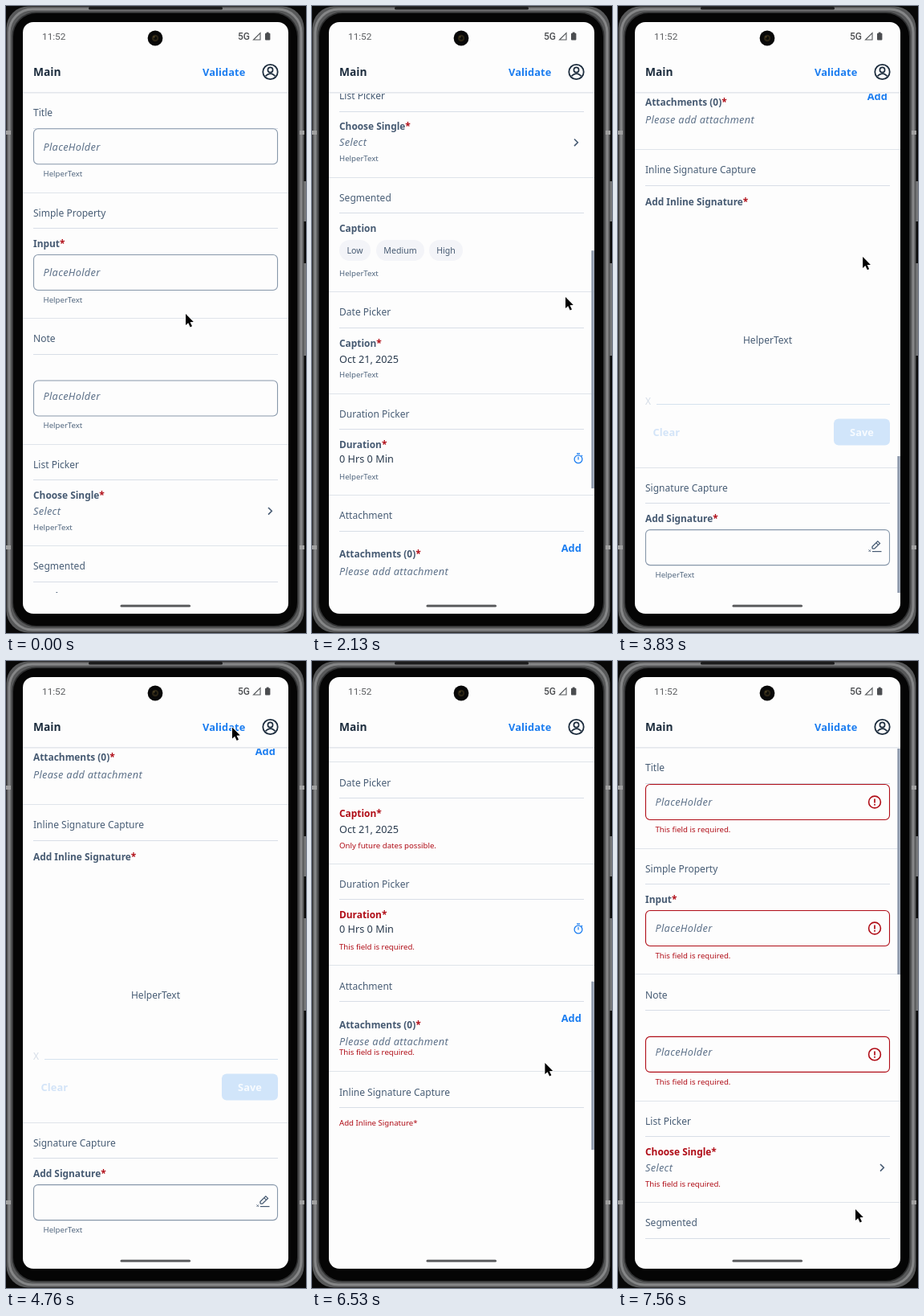
Write an HTML page with a canvas that moves like this. It is 374x780 px and loops after 7660 ms.

```html
<!DOCTYPE html>
<html lang="en">
<head>
<meta charset="utf-8">
<title>Form validation</title>
<style>
html, body { margin: 0; width: 100%; height: 100%; overflow: hidden; background: #000; }
canvas { display: block; width: 374px; height: 780px; }
</style>
</head>
<body>
<canvas id="stage"></canvas>
<script>
const W = 374, H = 780, LOOP = 7660, VALIDATED = 5050;
const canvas = document.getElementById('stage');
const ctx = canvas.getContext('2d');
const dpr = window.devicePixelRatio || 1;
canvas.width = W * dpr;
canvas.height = H * dpr;

const C = {
  page: '#fdfdfd', title: '#485d75', label: '#465a72', helper: '#52677f', value: '#2a3b4e',
  hint: '#5d7189', dark: '#1d2d3e', blue: '#1b7df0', red: '#b00d17', rule: '#d8dee7',
  box: '#8797aa', pale: '#d1e5fa', chip: '#f3f4f8', bar: '#8f9bad'
};
const SANS = '"Noto Sans", "Open Sans", sans-serif';
const FONTS = {
  title: { css: `400 12px ${SANS}`, size: 12, gap: 0.02 },
  label: { css: `600 11.9px ${SANS}`, size: 11.9, gap: 0 },
  value: { css: `400 12.7px ${SANS}`, size: 12.7, gap: 0 },
  hint: { css: `italic 400 12.7px ${SANS}`, size: 12.7, gap: 0.32 },
  small: { css: `400 9.65px ${SANS}`, size: 9.65, gap: 0 },
  chip: { css: `500 10.6px ${SANS}`, size: 10.6, gap: 0 },
  action: { css: `700 12.8px ${SANS}`, size: 12.8, gap: 0.1 },
  head: { css: `900 13.8px ${SANS}`, size: 13.8, gap: 0 },
  clock: { css: '400 11.8px Roboto, sans-serif', size: 11.8, gap: 0 },
  signal: { css: '500 12px Roboto, sans-serif', size: 12, gap: 0 }
};

// Motion tracks: time followed by values
const scrollTrack = [[1100, 0], [1950, 458.5], [2480, 458.5], [3130, 925.6], [3480, 1020.4],
  [5049, 1020.4], [5050, 1006.4], [6130, 1006.4], [6620, 644.3], [7060, 644.3], [7450, 0]];
const cursorTrack = [[150, 224, 383], [950, 300, 655], [1150, 302, 655], [1850, 316, 362],
  [2130, 316, 362], [2450, 314, 610], [2550, 313, 610], [3050, 307.8, 338.5], [3600, 307.8, 338.5],
  [4600, 282, 82.5], [5250, 282, 82.5], [5900, 284, 206], [6130, 284, 211.5],
  [6480, 290, 500], [6600, 291, 500], [7000, 296, 240], [7100, 296, 242.5], [7420, 296, 682]];
// Scroll offset, thumb top, thumb bottom
const thumbPlain = [[0, 108, 390], [458, 304, 600], [925, 510, 701], [1020, 560, 730]];
const thumbError = [[0, 108, 390], [644, 384, 597], [1006, 560, 730]];

const smooth = k => k * k * (3 - 2 * k);
const linear = k => k;

function sample(track, at, ease) {
  if (at <= track[0][0]) return track[0].slice(1);
  for (let i = 1; i < track.length; i++) {
    const a = track[i - 1], b = track[i];
    if (at <= b[0]) {
      const k = ease((at - a[0]) / (b[0] - a[0]));
      return a.slice(1).map((v, j) => v + (b[j + 1] - v) * k);
    }
  }
  return track[track.length - 1].slice(1);
}

function text(str, x, mid, font, color, align = 'left') {
  const f = FONTS[font];
  ctx.font = f.css;
  ctx.letterSpacing = f.gap + 'px';
  ctx.textAlign = align;
  ctx.fillStyle = color;
  ctx.fillText(str, x, mid + f.size * 0.36);
  return x + ctx.measureText(str).width;
}

function round(x, y, w, h, r) {
  ctx.beginPath();
  ctx.roundRect(x, y, w, h, r);
}

function fillRound(x, y, w, h, r, color) {
  round(x, y, w, h, r);
  ctx.fillStyle = color;
  ctx.fill();
}

function strokeRound(x, y, w, h, r, color, width = 1) {
  round(x, y, w, h, r);
  ctx.strokeStyle = color;
  ctx.lineWidth = width;
  ctx.stroke();
}

function path(points, color, width) {
  ctx.beginPath();
  points.forEach(([x, y], i) => i ? ctx.lineTo(x, y) : ctx.moveTo(x, y));
  ctx.strokeStyle = color;
  ctx.lineWidth = width;
  ctx.stroke();
}

function circle(x, y, r, color, width) {
  ctx.beginPath();
  ctx.arc(x, y, r, 0, Math.PI * 2);
  if (width) {
    ctx.strokeStyle = color;
    ctx.lineWidth = width;
    ctx.stroke();
  } else {
    ctx.fillStyle = color;
    ctx.fill();
  }
}

function rule(y, x1 = 34, x2 = 339, color = C.rule) {
  ctx.fillStyle = color;
  ctx.fillRect(x1, Math.round(y - 0.5), x2 - x1, 1);
}

function label(str, y, color = C.label) {
  text('*', text(str, 34, y, 'label', color), y, 'label', C.red);
}

function helper(y, error, x = 34, message = 'This field is required.') {
  text(error ? message : 'HelperText', x, y, 'small', error ? C.red : C.helper);
}

function alertIcon(x, y) {
  circle(x, y, 7.4, C.red, 1.6);
  path([[x, y - 4], [x, y + 1]], C.red, 1.7);
  circle(x, y + 3.3, 1, C.red);
}

function field(y, error, hint, hintY) {
  strokeRound(34.5, y + 0.5, 304, 44, 5.5, error ? C.red : C.box, 1.1);
  if (hint) text(hint, 46.5, hintY, 'hint', C.hint);
  if (error) alertIcon(320, y + 22.5);
  helper(y + 56.3, error, 46.5);
}

function section(name, y, first) {
  if (!first) rule(y - 25.5, 21, 352, '#dfe4ea');
  text(name, 34, y, 'title', C.title);
  rule(y + 19);
}

function stopwatch(x, y) {
  circle(x, y + 1, 4.9, C.blue, 1.3);
  path([[x - 2, y - 6], [x + 2, y - 6]], C.blue, 1.3);
  path([[x, y - 2], [x, y + 1.6]], C.blue, 1.2);
  path([[x + 3.8, y - 4], [x + 5, y - 2.8]], C.blue, 1.2);
}

function pencil(x, y) {
  path([[x - 4, y + 2.5], [x - 4, y], [x + 2.8, y - 6.8], [x + 5.5, y - 4.2], [x - 1.3, y + 2.6], [x - 4, y + 2.5]], C.label, 1.3);
  path([[x + 0.8, y - 4.8], [x + 3.4, y - 2.2]], C.label, 1.1);
  path([[x - 4, y + 6], [x + 7.5, y + 6]], C.label, 1.2);
  path([[x - 8.5, y + 3.8], [x - 6, y + 6.3]], C.label, 0.9);
  path([[x - 6, y + 3.8], [x - 8.5, y + 6.3]], C.label, 0.9);
}

function form(scroll, error) {
  const tone = error ? C.red : C.label;
  const shift = n => error ? n : 0;
  let y = 133 - scroll;
  section('Title', y, true);
  field(y + 19.3 + shift(0.7), error, 'PlaceHolder', y + 42);

  y = 257.5 - scroll + shift(1);
  section('Simple Property', y);
  label('Input', y + 38.5);
  field(y + 51.5, error, 'PlaceHolder', y + 74);

  y = 414 - scroll + shift(1.4);
  section('Note', y);
  field(y + 51.5, error, 'PlaceHolder', y + 71.3);

  y = 570.5 - scroll + shift(2);
  section('List Picker', y);
  label('Choose Single', y + 38, tone);
  text('Select', 34, y + 57.7, 'hint', C.hint);
  path([[327, y + 53.5], [331.3, y + 57.8], [327, y + 62.1]], C.label, 1.6);
  helper(y + 78, error);

  y = 697 - scroll + shift(2);
  section('Segmented', y);
  text('Caption', 34, y + 38, 'label', C.label);
  [['Low', 34, 39], ['Medium', 80, 60], ['High', 146, 42]].forEach(([name, x, w]) => {
    fillRound(x, y + 52.5, w, 26, 13, C.chip);
    text(name, x + w / 2, y + 65.5, 'chip', C.label, 'center');
  });
  if (!error) helper(y + 94, false);

  // Without its helper line the segmented block is shorter
  const lower = shift(-14) - scroll;
  y = 839.5 + lower;
  section('Date Picker', y);
  label('Caption', y + 38.3, tone);
  text('Oct 21, 2025', 34, y + 58, 'value', C.value);
  helper(y + 78, error, 34, 'Only future dates possible.');

  y = 966 + lower;
  section('Duration Picker', y);
  label('Duration', y + 38, tone);
  text('0 Hrs 0 Min', 34, y + 56, 'value', C.value);
  stopwatch(332, y + 55.3);
  helper(y + 78, error);

  y = 1092.5 + lower;
  section('Attachment', y);
  label('Attachments (0)', y + 48);
  text('Add', 336, y + 40.2, 'action', C.blue, 'right');
  text('Please add attachment', 34, y + 69, 'hint', C.hint);
  if (error) helper(y + 82.3, true);

  y = 1224.5 + lower;
  section('Inline Signature Capture', y);
  if (error) text('Add Inline Signature*', 34, y + 38, 'small', C.red);
  else {
    label('Add Inline Signature', y + 40);
    text('HelperText', 186.5, y + 212, 'title', C.title, 'center');
  }
  text('X', 34, y + 288 - shift(4), 'title', '#d5dde7');
  rule(y + 291 - shift(4), 48, 339, '#d5e2ef');
  const by = y + 326 - shift(2);
  text('Clear', 43.5, by, 'action', '#d3e4f8');
  fillRound(269, by - 16.5, 70, 33, 6, C.pale);
  text('Save', 304, by, 'action', '#f7fbff', 'center');
  if (error) helper(y + 346, true);

  y = 1620 + lower;
  section('Signature Capture', y);
  label('Add Signature', y + 38.5, tone);
  field(y + 51.5, error);
  if (!error) pencil(321, y + 73);
}

function phone() {
  ctx.fillStyle = '#080808';
  ctx.fillRect(0, 0, W, H);
  fillRound(369, 218, 6, 50, 1, '#77787a');
  fillRound(369, 320, 6, 115, 1, '#77787a');
  // Metal rim around the black bezel
  fillRound(0.5, 0.5, 371, 779, 27, '#58595a');
  strokeRound(4, 4, 364, 772, 29, '#858687', 3);
  ctx.fillStyle = '#a0a0a0';
  [155, 671].forEach(y => {
    ctx.fillRect(0, y, 6, 5);
    ctx.fillRect(366, y, 6, 5);
  });
  fillRound(7.5, 7.5, 357, 765, 30, '#303132');
  fillRound(9, 9, 354, 762, 29, '#050505');
  fillRound(103, 1, 167, 3.5, 1.5, '#1c1c1d');
  fillRound(21, 20, 331, 736, 13, C.page);
}

function chrome() {
  text('11:52', 45, 38, 'clock', '#5c5e61');
  text('5G', 289, 38, 'signal', '#4e5053');
  ctx.beginPath();
  ctx.moveTo(308.5, 42);
  ctx.lineTo(317, 42);
  ctx.lineTo(317, 33.5);
  ctx.closePath();
  ctx.strokeStyle = '#55585b';
  ctx.lineWidth = 1.1;
  ctx.stroke();
  fillRound(323, 33.8, 6.4, 8.8, 1, '#4b4d50');
  ctx.fillRect(324.8, 32.6, 2.8, 1.5);

  circle(186, 40, 9.4, '#080808');
  circle(186, 40, 4.2, '#2b2415');
  circle(186.3, 40, 2, '#0d0d0a');
  circle(184.5, 38.4, 0.9, '#64552e');

  text('Main', 34, 82, 'head', C.dark);
  text('Validate', 245, 82, 'action', C.blue);
  circle(329.5, 82, 9.2, C.dark, 1.8);
  circle(329.5, 79.5, 3.1, C.dark, 1.7);
  ctx.beginPath();
  ctx.arc(329.5, 91.3, 7.1, Math.PI * 1.19, Math.PI * 1.81);
  ctx.stroke();
  fillRound(142.5, 744.8, 87.5, 3, 1.5, '#5d5e60');
}

function cursor(x, y) {
  const shape = [[0, 0], [0, 14], [3.2, 11.2], [5.7, 16.4], [8, 15.3], [5.5, 10.2], [9.8, 10]];
  ctx.beginPath();
  shape.forEach(([dx, dy], i) => i ? ctx.lineTo(x + dx, y + dy) : ctx.moveTo(x, y));
  ctx.closePath();
  ctx.lineJoin = 'round';
  ctx.strokeStyle = '#fff';
  ctx.lineWidth = 1.6;
  ctx.stroke();
  ctx.fillStyle = '#000';
  ctx.fill();
  ctx.lineJoin = 'miter';
}

function draw(t) {
  const error = t >= VALIDATED;
  const [scroll] = sample(scrollTrack, t, smooth);
  const [cx, cy] = sample(cursorTrack, t, smooth);
  ctx.setTransform(dpr, 0, 0, dpr, 0, 0);
  phone();

  ctx.save();
  ctx.beginPath();
  ctx.rect(21, 108, 331, 622);
  ctx.clip();
  form(scroll, error);
  if ((t > 1100 && t < 4000) || t > 6080) {
    const [top, bottom] = sample(error ? thumbError : thumbPlain, scroll, linear);
    ctx.fillStyle = C.bar;
    ctx.fillRect(348.3, top, 3.4, bottom - top);
  }
  ctx.restore();

  rule(107.5, 21, 352, '#e3e7ec');
  rule(108.5, 21, 352, '#eef0f3');
  chrome();
  cursor(cx, cy);
}

let start;
function tick(now) {
  if (start === undefined) start = now;
  const t = (now - start) % LOOP;
  // The picture steps 15 times a second
  draw(Math.floor((t + 5) * 0.015) / 0.015);
  requestAnimationFrame(tick);
}
requestAnimationFrame(tick);
</script>
</body>
</html>
```
